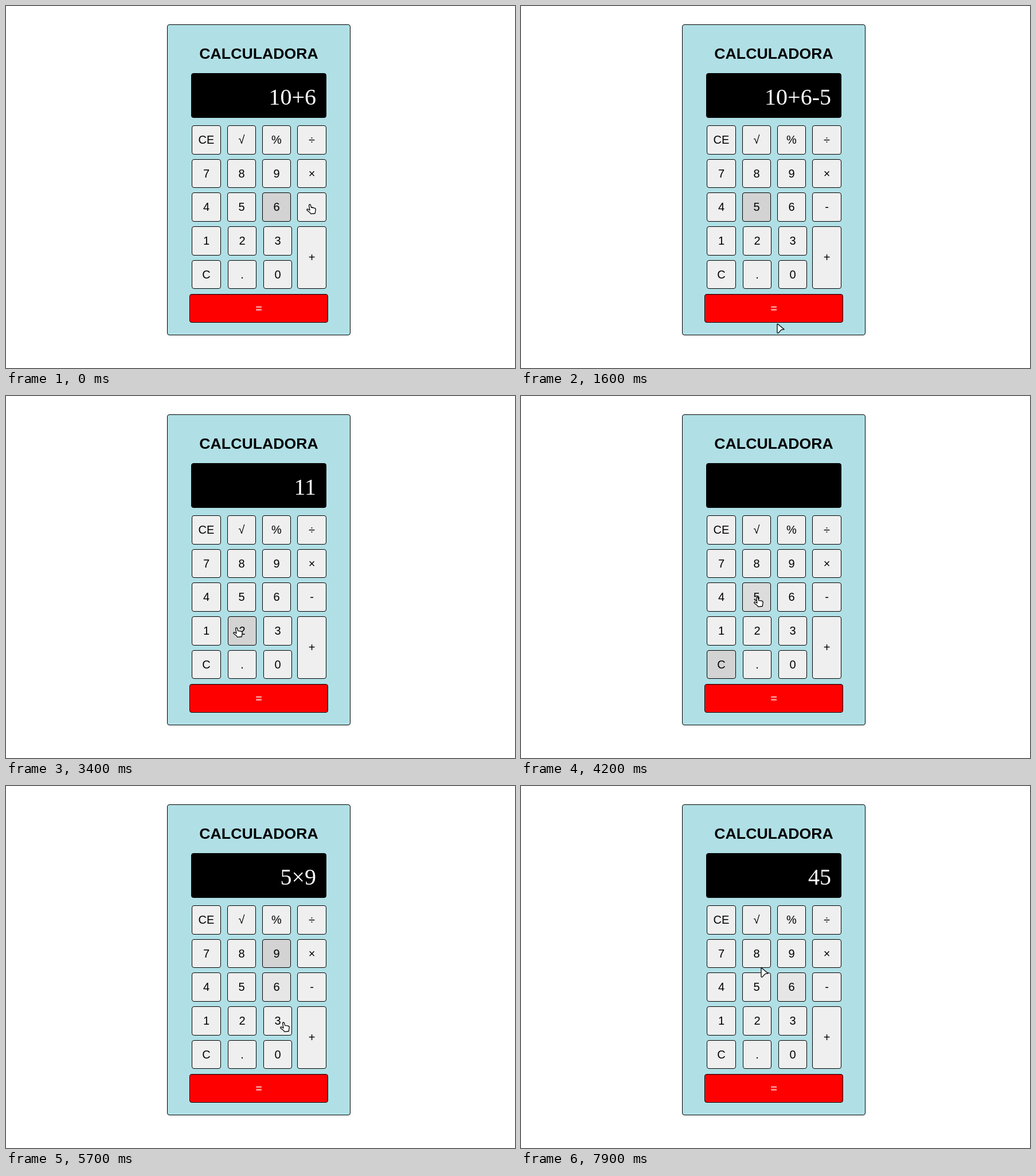
Recreate the animation shown at these times as an HTML page with a canvas. Size 888x631 px, loop 8 s.

```html
<!DOCTYPE html>
<html lang="pt">
<head>
<meta charset="utf-8">
<title>Calculadora</title>
<style>
html, body { margin: 0; width: 100%; height: 100%; overflow: hidden; background: #fff; }
canvas { display: block; }
</style>
</head>
<body>
<canvas id="stage" width="888" height="631"></canvas>
<script>
const ctx = document.getElementById('stage').getContext('2d');
const LOOP = 8000, STEP = 100;
const FADE = 0.68; // share of the hover fade done per step
const IDLE = 239, ACTIVE = 211;

// Keypad: a grid whose edges snap to whole pixels
const SIZE = 50.6, PITCH = 58.7, LEFT = 324.4, TOP = 208;
const keys = {};

function addKey(label, x, y, w = SIZE, h = SIZE) {
  const l = Math.round(x), t = Math.round(y);
  keys[label] = { label, x: l, y: t, w: Math.round(x + w) - l, h: Math.round(y + h) - t };
}

['CE √ % ÷', '7 8 9 ×', '4 5 6 -', '1 2 3', 'C . 0'].forEach((row, r) => {
  const gap = r < 3 ? 61.2 : 62.2;
  row.split(' ').forEach((label, c) => addKey(label, LEFT + gap * c, TOP + PITCH * r));
});
addKey('+', LEFT + 61.2 * 3, TOP + PITCH * 3, SIZE, PITCH + SIZE);
addKey('=', 320, TOP + PITCH * 5, 242);

// Pointer stops: a key, with an offset from its centre, and the time spent there
const stop = (label, arrive, leave, dx = 0, dy = 0) => {
  const k = keys[label];
  return { arrive, leave, x: k.x + k.w / 2 + dx, y: k.y + k.h / 2 + dy };
};
const stops = [
  stop('-', 0, 400, -4, -4),
  stop('5', 700, 900),
  stop('=', 1300, 1500, 5, 36),
  stop('=', 1600, 1600, 6, 28),
  stop('=', 1800, 2600, 14),
  stop('=', 2700, 2700, 25, -25),
  stop('2', 3400, 3400, -10, -5),
  stop('C', 3700, 3900, -12, 8),
  stop('5', 4100, 4700, 1, 1.5),
  stop('×', 5000, 5100),
  stop('9', 5200, 5300, 0, 4),
  stop('3', 5700, 5700, 10, 3.5),
  stop('=', 6000, 6000, 75, -10),
  stop('=', 6400, 6900, 29, 2),
  stop('2', 7400, 7400, 14, 5),
  stop('6', 7700, 7700, -10),
  stop('8', 7900, LOOP, 8, 26)
];

const presses = [
  [300, '-'], [800, '5'], [1900, '='], [3800, 'C'],
  [4400, '5'], [5100, '×'], [5300, '9'], [6500, '=']
];

function pointerAt(t) {
  const i = stops.findIndex(s => t <= s.leave), b = stops[i];
  if (t >= b.arrive) return b;
  const a = stops[i - 1], u = (t - a.leave) / (b.arrive - a.leave);
  return { x: a.x + (b.x - a.x) * u, y: a.y + (b.y - a.y) * u };
}

const keyAt = ({ x, y }) => Object.values(keys).find(
  k => x >= k.x && x < k.x + k.w && y >= k.y && y < k.y + k.h);

const focusAt = t => presses.reduce((key, [at, label]) => at <= t ? label : key, '6');

// Sum of signed products
const evaluate = str => String(str.match(/[+-]?[\d×]+/g)
  .map(term => term.split('×').reduce((p, n) => p * n, 1))
  .reduce((a, b) => a + b));

function press(str, label) {
  if (label === 'C') return '';
  return label === '=' ? evaluate(str) : str + label;
}

// The display reacts one step after a press
const displayAt = t => presses.reduce(
  (str, [at, label]) => at < t ? press(str, label) : str, '10+6');

// Highlight of every key, replayed from the start of the loop
function highlights(t) {
  const level = { 6: 1 };
  for (let s = 0; s < t; s += STEP) {
    const hover = keyAt(pointerAt(s)), focus = focusAt(s);
    for (const label in keys) {
      const dir = keys[label] === hover || label === focus ? 1 : -1;
      level[label] = Math.min(1, Math.max(0, (level[label] || 0) + dir * FADE));
    }
  }
  return level;
}

function box(x, y, w, h, fill) {
  ctx.beginPath();
  ctx.roundRect(x + 0.5, y + 0.5, w - 1, h - 1, 3.5);
  ctx.fillStyle = fill;
  ctx.fill();
  ctx.lineWidth = 1;
  ctx.strokeStyle = '#000';
  ctx.stroke();
}

function text(str, x, y, font, color, align = 'center') {
  ctx.font = font;
  ctx.fillStyle = color;
  ctx.textAlign = align;
  ctx.fillText(str, x, y);
}

const hand = new Path2D('M4.6 2.6C4.5.7 7 .4 7.5 2.2L8.6 6.3 14 7.2Q16.4 7.8 16.2 10L15.2 16.5 7.8 17.3Q7 15.4 4 13.2L1 11Q.3 9 2.6 9L6 11Z');
const arrow = new Path2D('M1 1.6Q1.3.6 2.2 1.4L13.2 10.7Q8.6 11 7 12.3 5.6 14.8 3 16.8 1 17.8 1 16Z');

function drawPointer(pos) {
  const over = keyAt(pos), shape = over ? hand : arrow;
  ctx.save();
  ctx.translate(Math.round(pos.x) - (over ? 6 : 1), Math.round(pos.y) - 2);
  ctx.lineJoin = 'round';
  ctx.lineWidth = 1.3;
  ctx.fillStyle = '#fff';
  ctx.strokeStyle = '#000';
  ctx.fill(shape);
  ctx.stroke(shape);
  ctx.restore();
}

function draw(t) {
  ctx.fillStyle = '#fff';
  ctx.fillRect(0, 0, 888, 631);
  box(281, 32, 320, 542, '#b0e0e6');
  text('CALCULADORA', 441, 92, 'bold 26.67px "Liberation Sans", sans-serif', '#000');
  box(323, 117, 236, 78, '#000');
  text(displayAt(t), 541, 172, '40px "Liberation Serif", serif', '#fff', 'right');

  const level = highlights(t);
  for (const k of Object.values(keys)) {
    const red = k.label === '=';
    const g = Math.round(IDLE + (ACTIVE - IDLE) * (level[k.label] || 0));
    box(k.x, k.y, k.w, k.h, red ? '#f00' : `rgb(${g},${g},${g})`);
    text(k.label, k.x + k.w / 2, Math.round(k.y + k.h / 2 + 6.5),
      '20px "Liberation Sans", sans-serif', red ? '#fff' : '#000');
  }
  drawPointer(pointerAt(t));
}

let last = -1;
const start = performance.now();
function tick() {
  const t = Math.floor(((performance.now() - start) % LOOP) / STEP) * STEP;
  if (t !== last) draw(last = t);
  requestAnimationFrame(tick);
}
tick();
</script>
</body>
</html>
```
